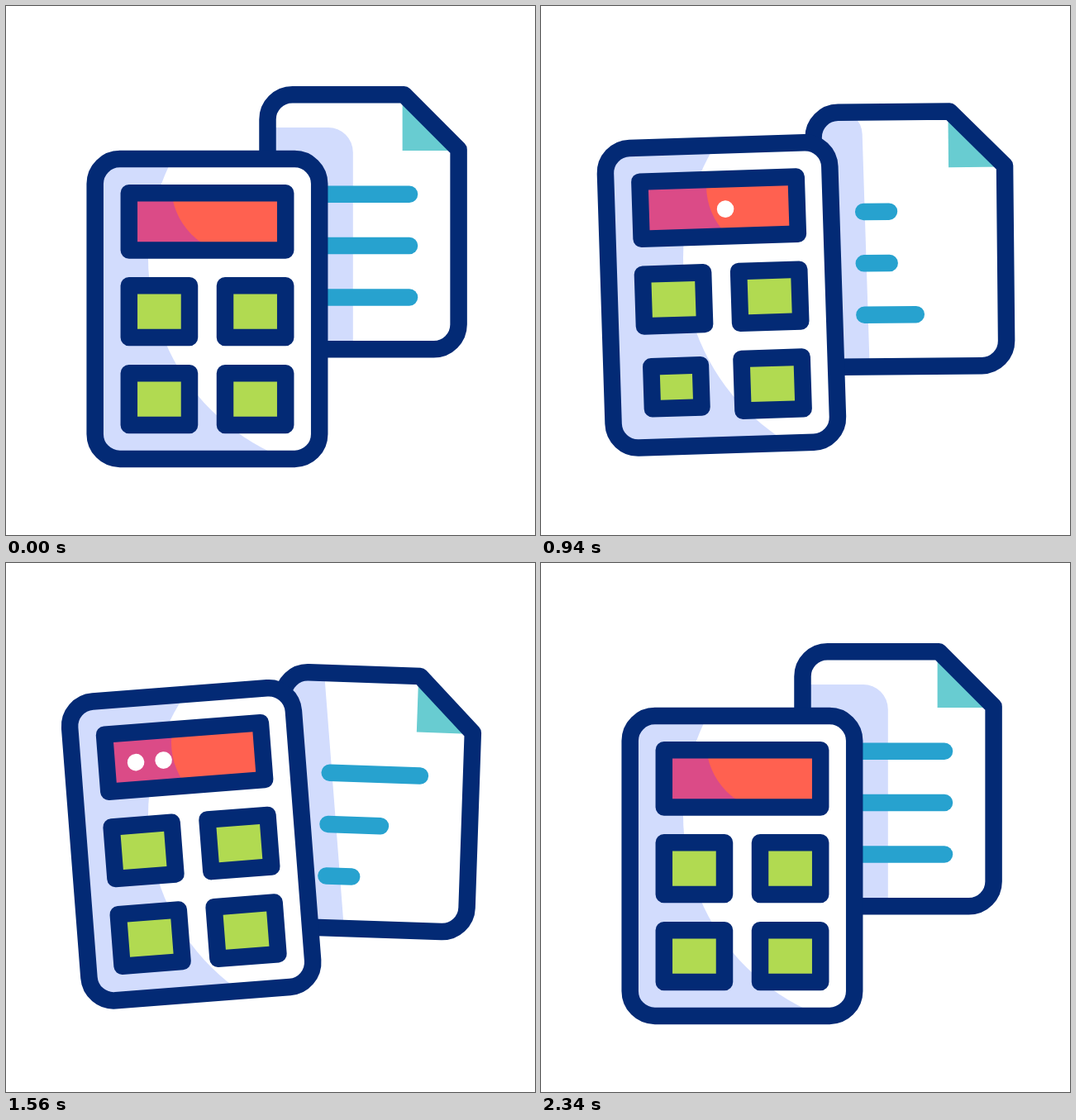
Write an HTML page with a canvas that moves like this. It is 640 by 640 pixels and loops after 2.4 s.

```html
<!DOCTYPE html>
<html lang="en">
<head>
<meta charset="utf-8">
<title>Calculator and document</title>
<style>
  html, body { margin: 0; width: 100%; height: 100%; overflow: hidden; background: #fff; }
  canvas { display: block; width: 640px; height: 640px; }
</style>
</head>
<body>
<canvas id="stage" width="640" height="640"></canvas>
<script>
const LOOP = 2400;
const NAVY = '#032a75', LILAC = '#d2dcfd', BLUE = '#27a2cf', TEAL = '#68ccd1',
      GREEN = '#b1da51', RED = '#ff6150', PINK = '#db4b87', WHITE = '#fff';
const STROKE = 20.5;

const ctx = document.getElementById('stage').getContext('2d');
const clamp = u => Math.min(1, Math.max(0, u));
const ramp = (t, a, b) => clamp((t - a) / (b - a));
const smooth = u => u * u * (3 - 2 * u);
const mix = (a, b, u) => a + (b - a) * u;
// Eases in for k < 0 and out for k > 0
const bend = (u, k) => u + k * u * (1 - u);

// Three swings between rests; the rate builds up, then dies away
const REST = { x: 0, y: 0, turn: 0, bow: 0 };
const START = 100;
const SWINGS = [
  { end: 685, move: -1, spin: -1 },
  { end: 1295, move: -0.22, spin: -0.08 },
  { end: 1745, move: 0.18, spin: -0.08 },
  { end: 2340, move: 1, spin: 1 }
];
// bow is the sideways bulge of the path that leads to the pose
const CALC = {
  center: [243.4, 366.5],
  poses: [
    REST,
    { x: -9.1, y: 34.6, turn: 7.3, bow: 0 },
    { x: -14.5, y: -105.4, turn: -15.5, bow: -15 },
    { x: -4.5, y: 19.4, turn: 3.9, bow: -12 },
    REST
  ]
};
const PAPER = {
  center: [432, 261.3],
  poses: [
    REST,
    { x: 5.8, y: -30.3, turn: -8, bow: 0 },
    { x: 6.2, y: 109, turn: 10.6, bow: 9 },
    { x: 5.8, y: -18.8, turn: -4.5, bow: 9 },
    REST
  ]
};

function place(t, { center: [cx, cy], poses }) {
  const i = Math.max(0, SWINGS.findIndex(s => t < s.end));
  const { end, move, spin } = SWINGS[i];
  const u = t < SWINGS[3].end ? ramp(t, i ? SWINGS[i - 1].end : START, end) : 0;
  const a = poses[i], b = poses[i + 1], p = bend(u, move);
  return new DOMMatrix()
    .translate(cx + mix(a.x, b.x, p) + b.bow * 4 * p * (1 - p), cy + mix(a.y, b.y, p))
    .rotate(mix(a.turn, b.turn, bend(u, spin)))
    .translate(-cx, -cy);
}

function box(x, y, w, h, r = 0) {
  const p = new Path2D();
  p.roundRect(x, y, w, h, r);
  return p;
}
function disc(x, y, r) {
  const p = new Path2D();
  p.arc(x, y, r, 0, Math.PI * 2);
  return p;
}
function fill(path, color) {
  ctx.fillStyle = color;
  ctx.fill(path);
}
function line(path, color) {
  ctx.strokeStyle = color;
  ctx.stroke(path);
}
// Fills a shape placed by `inner` within a region placed by `outer`
function fillInside(region, outer, shape, inner, color) {
  ctx.save();
  ctx.setTransform(outer);
  ctx.clip(region);
  ctx.setTransform(inner);
  fill(shape, color);
  ctx.restore();
}

const still = new DOMMatrix();
const body = box(107.7, 185.1, 271.5, 362.8, 30);
const shadow = box(148.3, 147, 271.5, 362.8, 30);
const screen = box(148.8, 226.2, 189.4, 69.2);
const bodyLight = disc(432, 305, 260);
const screenLight = box(200, 133.5, 240, 167, 83);
const sheet = new Path2D('M346.5 107.3H481.5L547.6 173.6V385.3a30 30 0 0 1-30 30H346.5a30 30 0 0 1-30-30V137.3a30 30 0 0 1 30-30Z');
const fold = new Path2D('M479.6 107.3V175H547.6V173.6L481.5 107.3Z');

function drawPaper(t, m, calc) {
  ctx.setTransform(m);
  fill(sheet, WHITE);
  fillInside(sheet, m, shadow, calc, LILAC);
  fill(fold, TEAL);
  for (let i = 0; i < 3; i++) {
    const s = t - i * 170, y = 227.7 + i * 62.4;
    const cut = smooth(ramp(s, 360, 780)) - smooth(ramp(s, 1230, 1600));
    line(new Path2D(`M376.2 ${y}H${488 - 81 * cut}`), BLUE);
  }
  line(sheet, NAVY);
}

function drawButton(t, i) {
  const x = 185.4 + (i % 2) * 116.2, y = 369.7 + (i >> 1) * 106;
  const press = 1 - smooth(clamp(Math.abs(t - 410 - i * 292) / 150));
  const k = 1 - 0.26 * press, w = 73.2 * k, h = 62.8 * k;
  const key = box(x - w / 2, y - h / 2, w, h);
  fill(key, GREEN);
  line(key, NAVY);
}

function drawDots(t) {
  for (let i = 0; i < 3; i++) {
    const s = t - i * 200;
    let a = 0;
    for (const start of [118, 1176])
      a += ramp(s, start, start + 100) - ramp(s, start + 482, start + 582);
    ctx.globalAlpha = clamp(a);
    fill(disc(184.2 + i * 33.6, 262.5, 10.3), WHITE);
  }
  ctx.globalAlpha = 1;
}

function drawCalc(t, m) {
  ctx.setTransform(m);
  fill(body, LILAC);
  fillInside(body, m, bodyLight, still, WHITE);
  fill(screen, PINK);
  fillInside(screen, m, screenLight, still, RED);
  drawDots(t);
  line(screen, NAVY);
  for (let i = 0; i < 4; i++) drawButton(t, i);
  line(body, NAVY);
}

function frame(now) {
  const t = now % LOOP;
  const calc = place(t, CALC), paper = place(t, PAPER);
  ctx.setTransform(still);
  ctx.fillStyle = WHITE;
  ctx.fillRect(0, 0, 640, 640);
  ctx.lineWidth = STROKE;
  ctx.lineCap = ctx.lineJoin = 'round';
  drawPaper(t, paper, calc);
  drawCalc(t, calc);
}

const begin = performance.now();
function tick() {
  frame(performance.now() - begin);
  requestAnimationFrame(tick);
}
tick();
</script>
</body>
</html>
```
